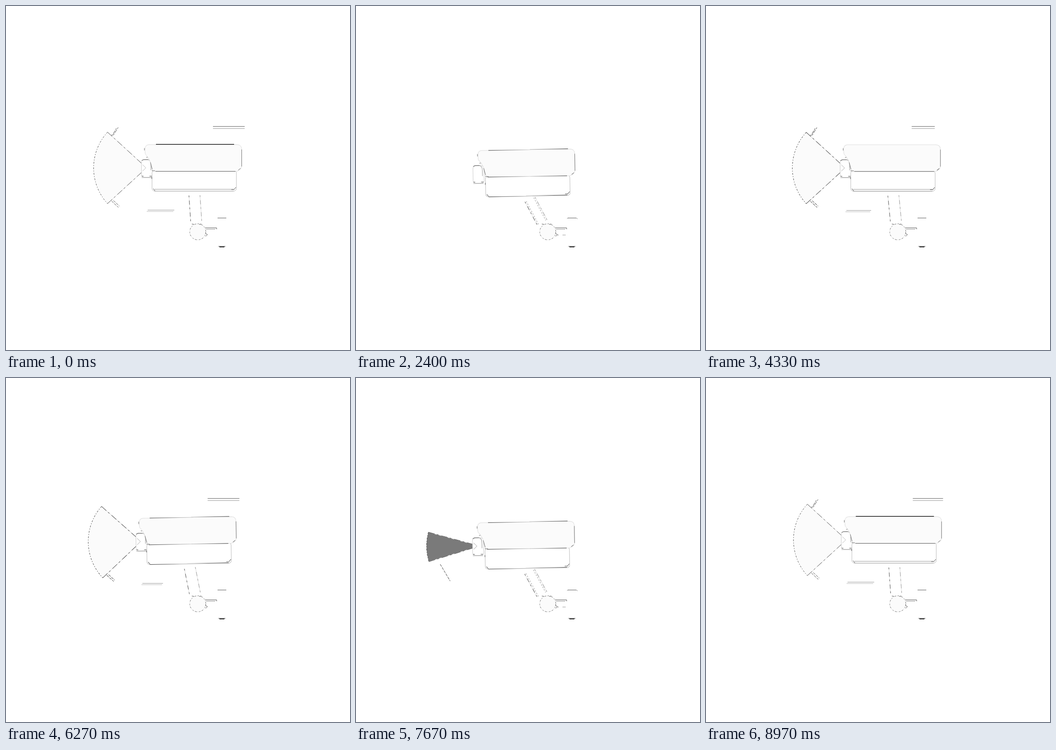
An HTML page for the animation above (9.01 s loop, 748 px wide and 748 px high).

```html
<!DOCTYPE html>
<html lang="en">
<head>
<meta charset="utf-8">
<title>Surveillance camera</title>
<style>
  html, body { margin: 0; width: 100%; height: 100%; overflow: hidden; background: #fff; }
  svg { display: block; width: 100vw; height: 100vh; }
  path { fill: none; stroke-width: 1; }
  .pale { stroke: #ddd; }
  .soft { stroke: #bbb; }
  .mid { stroke: #999; }
  .ink { stroke: #555; }
  .dark { stroke: #222; stroke-width: 1.6; }
  .shell { fill: #fbfbfb; }
  .case { fill: #fff; }
</style>
</head>
<body>
<svg viewBox="0 0 748 748">
  <defs>
    <linearGradient id="fadeR" gradientUnits="userSpaceOnUse" x1="318" y1="0" x2="420" y2="0">
      <stop offset="0" stop-color="#333"/><stop offset="1" stop-color="#ddd"/>
    </linearGradient>
    <linearGradient id="fadeL" gradientUnits="userSpaceOnUse" x1="405" y1="0" x2="498" y2="0">
      <stop offset="0" stop-color="#ddd"/><stop offset="1" stop-color="#333"/>
    </linearGradient>
  </defs>

  <!-- speed lines -->
  <g id="upper"><path id="upperInk" class="ink" stroke-width="1.400"/><path id="upperPale" class="mid"/></g>
  <g id="lower"><path id="lowerInk" class="mid"/><path id="lowerPale" class="soft"/></g>

  <!-- arm -->
  <g id="arm">
    <path class="pale" d="M-12-79V-22M12-78V-22"/>
    <path class="ink" stroke-dasharray="4 7 9 6" d="M-12-79V-22"/>
    <path class="mid" stroke-dasharray="4 7 9 6" d="M12-78V-22"/>
    <path id="armTwin" class="mid" stroke-dasharray="3 3" d="M-9-79V-22M9-78V-22"/>
  </g>

  <!-- wall mount -->
  <circle class="shell" cx="417" cy="491" r="17.500" stroke="#e4e4e4"/>
  <circle cx="417" cy="491" r="17.500" fill="none" stroke="#666" stroke-dasharray="3 4 2 6"/>
  <path class="ink" d="M404 474l5 1M420 475l5-1M433 482.500h25v3M433 494l5 3l-4 4"/>
  <path class="mid" d="M435 485.500h20"/>
  <path class="ink" d="M460 461h19"/>
  <path class="ink" d="M462 522.500h15"/>
  <path class="dark" d="M464 524h11"/>
  <path id="mountTwin" class="mid" d="M437 498h4M449 498h7M459 463l2-2M479 461l3 2"/>

  <!-- camera -->
  <g id="camera">
    <g id="beam">
      <path id="fan"/>
      <path class="pale" id="sidesPale"/>
      <path id="sides" class="ink" stroke-dasharray="14 5 4 6"/>
      <path id="rim" class="ink" stroke-dasharray="4 3 2 3"/>
    </g>
    <path id="tickTop" class="ink" stroke-dasharray="8 2"/>
    <path id="tickLow" class="ink" stroke-dasharray="6 2"/>

    <g id="lens">
      <rect class="case" x="294.500" y="334.500" width="24" height="38" rx="6" stroke="#ccc"/>
      <path class="ink" d="M295 336l4-2h10M295 370h4M312 370h5"/>
      <path class="mid" d="M309 334q6 2 6 11v12M295 373h22"/>
      <path id="tip" class="soft" d="M297 345l7 7l-7 7"/>
    </g>

    <rect class="case" x="317.500" y="357.500" width="183.500" height="45" rx="6" stroke="#bbb"/>
    <path id="flatBase" class="mid" d="M323 398.500h172M323 402.500h172"/>
    <path class="ink" d="M320 397l4 5M490 399h6l4-5M317 372v4"/>

    <path class="shell" stroke="#ddd" d="M310 301.500H503Q512.500 302 512.500 312V349Q511 357 501 359.500H319L314 340Q311 330 303 322Q299 302 310 301.500Z"/>
    <path class="ink" stroke-opacity=".8" d="M512.500 312V349M301 309v5M305 329h3M314 340l4 15M505 357l5-4M317 358h7"/>
    <path id="flatTop" class="dark" d="M326 300.800H496"/>
    <path id="flatMid" class="ink" d="M325 359.500H499"/>
    <g id="tilted">
      <path stroke="url(#fadeR)" d="M325 301.500l95 .1M322 359.500l95 .1M324 402.500l95 .1"/>
      <path stroke="url(#fadeL)" d="M415 300.800l83 .1M415 359.500l80 .1M405 401.500l90 .1"/>
    </g>
  </g>
</svg>
<script>
const LOOP = 9010, SWING = 4500;
const $ = {};
document.querySelectorAll('[id]').forEach(el => $[el.id] = el);

const clamp = x => Math.max(0, Math.min(1, x));
const ramp = (t, a, b) => clamp((t - a) / (b - a));
const mix = (a, b, k) => a + (b - a) * k;
const ease = u => u < .5 ? 8 * u ** 4 : 1 - 8 * (1 - u) ** 4;
const rad = Math.PI / 180;
const set = (el, name, value) => el.setAttribute(name, value);
const fade = (el, k) => set(el, 'opacity', k);

// 0 = leaning right, 1 = leaning left
function lean(p) {
  if (p >= 3000) return 1 - ease((p - 3000) / 2000);
  if (p < 500) return 1 - ease((p + 1500) / 2000);
  return ease(ramp(p, 875, 2875));
}

function drawBeam(p) {
  const open = p < 2700 ? 1 - ramp(p, 1850, 2350) : ramp(p, 3000, 3450);
  const a = 42.5 * open * rad, r = 115, ax = 305.5, ay = 352;
  const x = ax - r * Math.cos(a), h = r * Math.sin(a);
  const top = `${x} ${ay - h}`, low = `${x} ${ay + h}`;
  const arc = `A${r} ${r} 0 0 0 ${low}`;
  const sides = `M${top}L${ax} ${ay}M${low}L${ax} ${ay}`;
  const shade = Math.round(p > 2700 ? mix(122, 251, ramp(p, 3250, 3480)) : 251);
  fade($.beam, open > 0 ? 1 : 0);
  fade($.tip, open > 0 ? 1 : 0);
  set($.fan, 'd', `M${ax} ${ay}L${top}${arc}Z`);
  $.fan.style.fill = `rgb(${shade},${shade},${shade})`;
  set($.sidesPale, 'd', sides);
  set($.sides, 'd', sides);
  set($.rim, 'd', `M${top}${arc}`);

  // ticks beside the two corners of the beam
  const k = p > 2700 ? ramp(p, 3170, 3600) : 1;
  const sx = ax + mix(-86, -76, k), sy = ay + mix(38, 72, k);
  const ex = ax + mix(-65, -61, k), ey = ay + mix(75, 86, k);
  const twin = k === 1 ? `M${sx + 4} ${sy - 1}L${ex + 2} ${ey - 3}` : '';
  set($.tickLow, 'd', `M${sx} ${sy}L${ex} ${ey}${twin}`);
  set($.tickTop, 'd', 'M229 281l5-1l10-16M233 278l7-12');
  fade($.tickLow, p > 2700 ? ramp(p, 3030, 3150) : 1 - ramp(p, 1850, 2200));
  fade($.tickTop, p > 2700 ? ramp(p, 3500, 3800) : 1 - ramp(p, 1450, 1750));
}

function drawLines(p, dx, s) {
  const back = p < 2700;
  const wide = 69 * (back ? 1 - ramp(p, 1800, 2200) : ramp(p, 3880, 4500));
  set($.upperInk, 'd', `M${450 + dx} 262h${wide}`);
  set($.upperPale, 'd', `M${450 + dx} 266.500h${wide}`);
  fade($.upper, wide > 0 ? 1 : 0);

  const grown = back ? 58 - 13 * ramp(p, 1400, 1770) - 45 * ramp(p, 1770, 2150)
                     : 58 * ramp(p, 3700, 4380);
  const y = 443.500 + 3 * clamp(s / .3);
  set($.lowerInk, 'd', `M${308 + dx} ${y}h${grown}`);
  set($.lowerPale, 'd', `M${306 + dx} ${y + 3}h${grown}`);
  fade($.lower, grown > 0 ? 1 : 0);
}

function draw(now) {
  const p = (now % LOOP) % SWING;
  const s = lean(p);
  const angle = mix(3, 28.5, s), rest = 3.8 * rad, a = angle * rad;
  const dx = -90 * (Math.sin(a) - Math.sin(rest));
  const dy = 97 * (Math.cos(rest) - Math.cos(a));
  const bend = ramp(s, .1, .3);

  set($.arm, 'transform', `translate(415 490) rotate(${-angle})`);
  set($.camera, 'transform', `translate(${dx} ${dy}) rotate(${-bend} 409 360)`);
  set($.lens, 'transform', `translate(${-4 * ramp(s, .3, 1)} 0)`);
  fade($.armTwin, ramp(s, .4, .9));
  fade($.mountTwin, ramp(s, .85, .97));
  fade($.flatTop, 1 - ramp(s, .05, .085));
  fade($.flatBase, 1 - bend);
  fade($.flatMid, 1 - bend);
  fade($.tilted, bend);

  drawBeam(p);
  drawLines(p, dx, s);
}

function tick(now) {
  draw(now);
  requestAnimationFrame(tick);
}
draw(0);
requestAnimationFrame(tick);
</script>
</body>
</html>
```
